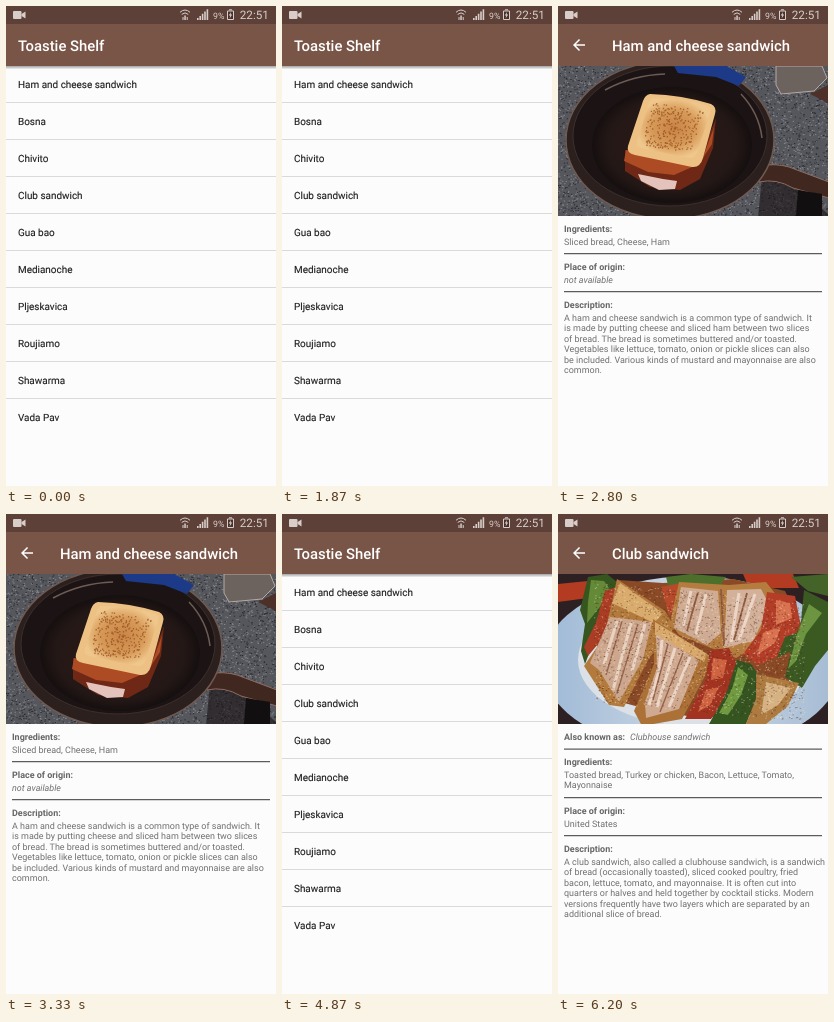
An HTML page that plays this animation: 270 px wide and 480 px high, repeating every 6.27 s.

```html
<!DOCTYPE html>
<html lang="en">
<head>
<meta charset="utf-8">
<title>Recipe app</title>
<style>
html, body { margin: 0; width: 100%; height: 100%; overflow: hidden; background: #fcfcfc; }
svg { display: block; width: 270px; height: 480px; }
text { font-family: Roboto, "Noto Sans", sans-serif; text-rendering: geometricPrecision; white-space: pre; }
.bar { font-size: 14.85px; font-weight: 500; fill: #fff; }
.row { font-size: 9.95px; fill: #1c1c1c; stroke: #1c1c1c; stroke-width: .12px; }
.body, .head { font-size: 8.97px; fill: #707070; }
.head { font-weight: 700; fill: #666; }
.it { font-style: italic; }
.status { fill: #d8cdc9; }
#ham, #clubhouse { visibility: hidden; animation: 6.27s step-end infinite; }
#ham { animation-name: ham; }
#clubhouse { animation-name: clubhouse; }
@keyframes ham {
  0% { visibility: hidden; }
  30.78% { visibility: visible; }
  57.41%, 100% { visibility: hidden; }
}
@keyframes clubhouse {
  0% { visibility: hidden; }
  86.12%, 100% { visibility: visible; }
}
</style>
</head>
<body>
<svg viewBox="0 0 270 480" xmlns="http://www.w3.org/2000/svg">
  <defs>
    <linearGradient id="shade" x2="0" y2="1">
      <stop offset="0" stop-color="#4a4a52" stop-opacity=".5"/>
      <stop offset="1" stop-color="#4a4a52" stop-opacity="0"/>
    </linearGradient>
    <radialGradient id="toast">
      <stop offset="0" stop-color="#c98445"/>
      <stop offset=".6" stop-color="#d79a58"/>
      <stop offset="1" stop-color="#efc78c"/>
    </radialGradient>
    <radialGradient id="iron">
      <stop offset="0" stop-color="#2a1814"/>
      <stop offset=".8" stop-color="#241816"/>
      <stop offset="1" stop-color="#150f0f"/>
    </radialGradient>
    <linearGradient id="plate">
      <stop offset="0" stop-color="#9db8d6"/>
      <stop offset=".5" stop-color="#cfd9e4"/>
      <stop offset="1" stop-color="#a3bad3"/>
    </linearGradient>
    <clipPath id="photo"><path d="M0 60h270v150H0z"/></clipPath>
  </defs>

  <path fill="#fcfcfc" d="M0 0h270v480H0z"/>
  <g id="list">
    <path fill="url(#shade)" d="M0 60h270v3.5H0z"/>
    <path fill="#795548" d="M0 18h270v42H0z"/>
    <text class="bar" x="12" y="44.5">Toastie Shelf</text>
  </g>

  <g id="ham">
    <path fill="#fcfcfc" d="M0 18h270v462H0z"/>
    <path fill="#795548" d="M0 18h270v42H0z"/>
    <g clip-path="url(#photo)">
      <path fill="#55575d" d="M0 60h270v150H0z"/>
      <path id="specks" stroke="#83858b" fill="none"/>
      <path id="pits" stroke="#2b2c32" fill="none"/>
      <path fill="#6c635f" stroke="#b5aaa3" d="M218 60h46l5 12-13 13-33 3-5-9z"/>
      <path fill="#4d3028" d="M252 88l18-9v18z"/>
      <path fill="#1a1213" d="M204 170q28 0 43 18l23 20v4h-70z" opacity=".6"/>
      <path fill="#40271f" stroke="#8d6c60" d="M203 160q14-3 28 1l40 15v16l-36-10q-17-10-34-6z"/>
      <path fill="#120f10" d="M240 184l24 4v22h-26z"/>
      <ellipse cx="112" cy="134" rx="104" ry="79" fill="#2b201e" stroke="#6f5a51" stroke-width="1.5"/>
      <ellipse cx="112" cy="130" rx="97" ry="70" fill="#1c1414" stroke="#3c302c"/>
      <ellipse cx="114" cy="139" rx="80" ry="58" fill="url(#iron)"/>
      <path fill="#1c3a88" d="M116 60h52l20 11-7 9-23-9-38-4z"/>
      <path fill="none" stroke="#6d5c55" stroke-width="1.5" d="M47 84q28-15 60-16M183 88q18 19 21 44"/>
      <g transform="translate(-2 0)">
        <path fill="#6e2815" d="M69 144l74 10 17-42-3 30-13 31-20 11-30-3-25-16z"/>
        <path fill="#ad4b24" d="M70 144l75 13 13-36-2 17-13 20-25 11-26-3-24-11z"/>
        <path fill="#e3c3bb" d="M82 168l25 5 14 2-2 8-16 1-18-9z"/>
        <path fill="#edc184" d="M94 88q32 1 61 10 6 3 4 10l-12 44q-3 10-11 9l-57-12q-9-2-7-9l15-45q2-6 7-7z"/>
        <path fill="url(#toast)" d="M97 92q29 0 55 8 4 2 2 7l-13 40q-2 6-8 5l-48-10q-6-2-4-7l12-38q1-4 4-5z"/>
        <path id="crumbs" stroke="#96501f" stroke-width="1.4" fill="none" opacity=".75"/>
      </g>
    </g>
  </g>

  <g id="clubhouse">
    <path fill="#fcfcfc" d="M0 18h270v462H0z"/>
    <path fill="#795548" d="M0 18h270v42H0z"/>
    <g clip-path="url(#photo)">
      <path fill="#2c2022" d="M0 60h270v150H0z"/>
      <path fill="#b23b22" d="M0 70l30-3v17L0 88zM185 60h50l6 14h-50z"/>
      <ellipse cx="134" cy="150" rx="150" ry="88" fill="url(#plate)"/>
      <ellipse cx="136" cy="146" rx="116" ry="66" fill="#dbe1e7"/>
      <path fill="#8a4a26" d="M36 82l24-16 45 3 70-4 52 12 20 40-18 56-24 30h-70l-50-9-30-8-15-40z"/>

      <path fill="#36551f" d="M30 63l19-3 15 12-9 25-16 22-12 31-4-13 4-27-5-14z"/>
      <path fill="#648a38" d="M33 66l13 1 7 10-12 17-12 15 1-21z"/>
      <path fill="#ab3d25" d="M47 77l14-5-4 35-17 23-10 12-4-9 12-25z"/>
      <path fill="#4c702b" d="M108 63l25-3 35 3-8 12-34-3-13 11z"/>
      <path fill="#b74a2b" d="M103 73l25-5-5 18-12 16z"/>

      <path fill="#b27a3c" d="M59 65l48 32 10 17-26 30-25 49-15-2-25-39 20-29z"/>
      <path fill="#d9ab6d" d="M62 69l43 30-9 10-42-20z"/>
      <path fill="#cda78d" d="M52 103l42 5-9 37-24 43-20-32-9-7z"/>
      <path fill="none" stroke="#ead2c0" stroke-width="3" d="M59 107l-13 43M73 109l-18 67M87 110l-13 47"/>
      <path fill="none" stroke="#96654f" stroke-width="1.4" d="M64 107l-16 54M80 110l-21 69"/>

      <path fill="#b57c40" d="M121 68l50 3 37-3 15 19-18 41-27 16-57-23-9-12z"/>
      <path fill="#cfab93" d="M123 73l37 4 3 42-14 12-33-17z"/>
      <path fill="#d3b099" d="M169 76l34-1 9 17-17 35-29 7z"/>
      <path fill="none" stroke="#ecd5c5" stroke-width="3" d="M133 77l-8 35M148 80l-10 40M181 79l-8 49M197 80l-16 46"/>
      <path fill="none" stroke="#8f5a42" stroke-width="1.8" d="M140 78l-11 39M163 75l3 55M189 79l-13 47"/>

      <path fill="#b33d27" d="M209 78l28 4 5 26-17 32-25 11-15-11 18-24z"/>
      <path fill="#d9724f" d="M218 86l14 3 2 15-16 7zM205 119l18-7-6 17-18 12z"/>
      <path fill="#3a5a22" d="M246 76l24 12v48l-13 16-13 22-17-11 6-26-14 7 8-21 15-5z"/>
      <path fill="#6d9440" d="M251 90l13 9-16 21-10 27-8 8 9-35z"/>
      <path fill="#446329" d="M233 63l37-3v22l-20-5z"/>

      <path fill="#ac7137" d="M95 105l57 37-5 20-23 43-40 7-8-15 20-47z"/>
      <path fill="#d9a96b" d="M97 108l52 32-3 8-49-27z"/>
      <path fill="#cfaa91" d="M98 120l43 26-20 49-33 9-1-16 12-34z"/>
      <path fill="none" stroke="#ecd5c5" stroke-width="3" d="M104 126l-3 31-10 34M117 134l-18 59M132 143l-21 50"/>
      <path fill="none" stroke="#96624d" stroke-width="1.4" d="M110 130l-15 56M125 139l-23 59"/>

      <path fill="#a23320" d="M152 136l19-2 8 17-9 34-17 20h-26l21-40z"/>
      <path fill="#cf6340" d="M155 144l14 2-4 18-12 2zM148 176l13-3-9 18-12 7z"/>
      <path fill="#345420" d="M179 146l14 4 9 13-5 25-9 22h-37l17-30z"/>
      <path fill="#6f9a40" d="M180 153l10 8-7 20-13 20-9-2 13-24z"/>
      <path fill="#ad7a40" d="M198 160l43 9-11 23-22 18h-20l10-25z"/>
      <path fill="#d6b283" d="M208 168l25 6-13 17-17 10z"/>
      <path id="dark" stroke="#4a2413" fill="none" opacity=".42"/>
      <path id="light" stroke="#fff0d8" fill="none" opacity=".38"/>
    </g>
  </g>

  <path fill="#5d4037" d="M0 0h270v18H0z"/>
  <g class="status">
    <rect x="7" y="5" width="8.5" height="8" rx="1"/>
    <path d="M15.5 8l4-2.5v7l-4-2.5z"/>
    <g fill="none" stroke="#d8cdc9">
      <path d="M174 6.3q5-4.6 10 0M175.7 8.4q3.3-3 6.6 0"/>
      <path fill="#47312a" d="M221.5 5h6v8.5h-6zM223 3.8h3"/>
    </g>
    <path d="M178.3 9.5h1.5V14h-1.5zM176.5 11h1v3h-1zM180.7 11h1v3h-1z"/>
    <path d="M191 14v-2h1.6v2zM193.4 14v-4H195v4zM195.8 14V7.8h1.6V14zM198.2 14V5.5h1.6V14zM200.6 14V3.2h1.6V14zM225 6l-2.3 3.6h1.5l-.6 2.8 2.6-3.8h-1.5z"/>
    <text x="207" y="12.8" font-size="8.8">9%</text>
    <text x="233.8" y="13.4" font-size="11.7">22:51</text>
  </g>
</svg>
<script>
const $ = id => document.getElementById(id);

function add(parent, tag, attrs, content) {
  const el = document.createElementNS("http://www.w3.org/2000/svg", tag);
  for (const key in attrs) el.setAttribute(key, attrs[key]);
  if (content) el.textContent = content;
  parent.append(el);
}

const write = (parent, cls, x, y, content) => add(parent, "text", { class: cls, x, y }, content);

["Ham and cheese sandwich", "Bosna", "Chivito", "Club sandwich", "Gua bao",
 "Medianoche", "Pljeskavica", "Roujiamo", "Shawarma", "Vada Pav"].forEach((name, i) => {
  const y = 82 + 37 * i;
  write($("list"), "row", 12, y, name);
  if (i < 9) add($("list"), "path", { fill: "#dadada", d: `M0 ${y + 14}h270v1H0z` });
});

function detail(id, title, rules, sections) {
  const page = $(id);
  add(page, "path", {
    fill: "#fff", transform: "translate(12 30) scale(.75)",
    d: "M20 11H7.83l5.59-5.59L12 4l-8 8 8 8 1.41-1.41L7.83 13H20v-2z"
  });
  write(page, "bar", 54, 44.5, title);
  rules.forEach(y => add(page, "path", { fill: "#5c5c5c", d: `M6 ${y}h258v1.2H6z` }));
  sections.forEach(([y, head, lines, style = ""]) => {
    write(page, "head", 6, y, head);
    lines.forEach((line, i) => write(page, "body " + style, 6, y + 12.6 + 10.5 * i, line));
  });
}

detail("ham", "Ham and cheese sandwich", [247, 285], [
  [226, "Ingredients:", ["Sliced bread, Cheese, Ham"]],
  [264, "Place of origin:", ["not available"], "it"],
  [302, "Description:", [
    "A ham and cheese sandwich is a common type of sandwich. It",
    "is made by putting cheese and sliced ham between two slices",
    "of bread. The bread is sometimes buttered and/or toasted.",
    "Vegetables like lettuce, tomato, onion or pickle slices can also",
    "be included. Various kinds of mustard and mayonnaise are also",
    "common."]]
]);

detail("clubhouse", "Club sandwich", [234.5, 283, 321], [
  [226, "Also known as:", []],
  [251.2, "Ingredients:", [
    "Toasted bread, Turkey or chicken, Bacon, Lettuce, Tomato,",
    "Mayonnaise"]],
  [300, "Place of origin:", ["United States"]],
  [338, "Description:", [
    "A club sandwich, also called a clubhouse sandwich, is a sandwich",
    "of bread (occasionally toasted), sliced cooked poultry, fried",
    "bacon, lettuce, tomato, and mayonnaise. It is often cut into",
    "quarters or halves and held together by cocktail sticks. Modern",
    "versions frequently have two layers which are separated by an",
    "additional slice of bread."]]
]);
write($("clubhouse"), "body it", 72, 226, "Clubhouse sandwich");

// Seeded grain for the stone worktop, the toast and the fillings
let seed = 7;
const rand = () => (seed = seed * 16807 % 2147483647) / 2147483647;
function grain(id, count, place) {
  let d = "";
  while (count--) d += `M${place(rand(), rand()).map(v => v.toFixed(1))}h1.3`;
  $(id).setAttribute("d", d);
}
const stone = (u, v) => [270 * u, 60 + 150 * v];
const food = (u, v) => [36 + 210 * u, 68 + 120 * v + 20 * u];
grain("specks", 2600, stone);
grain("pits", 2600, stone);
grain("crumbs", 260, (u, v) => [97 + 50 * u - 13 * v, 97 + 42 * v + 8 * u]);
grain("dark", 1500, food);
grain("light", 1200, food);
</script>
</body>
</html>
```
